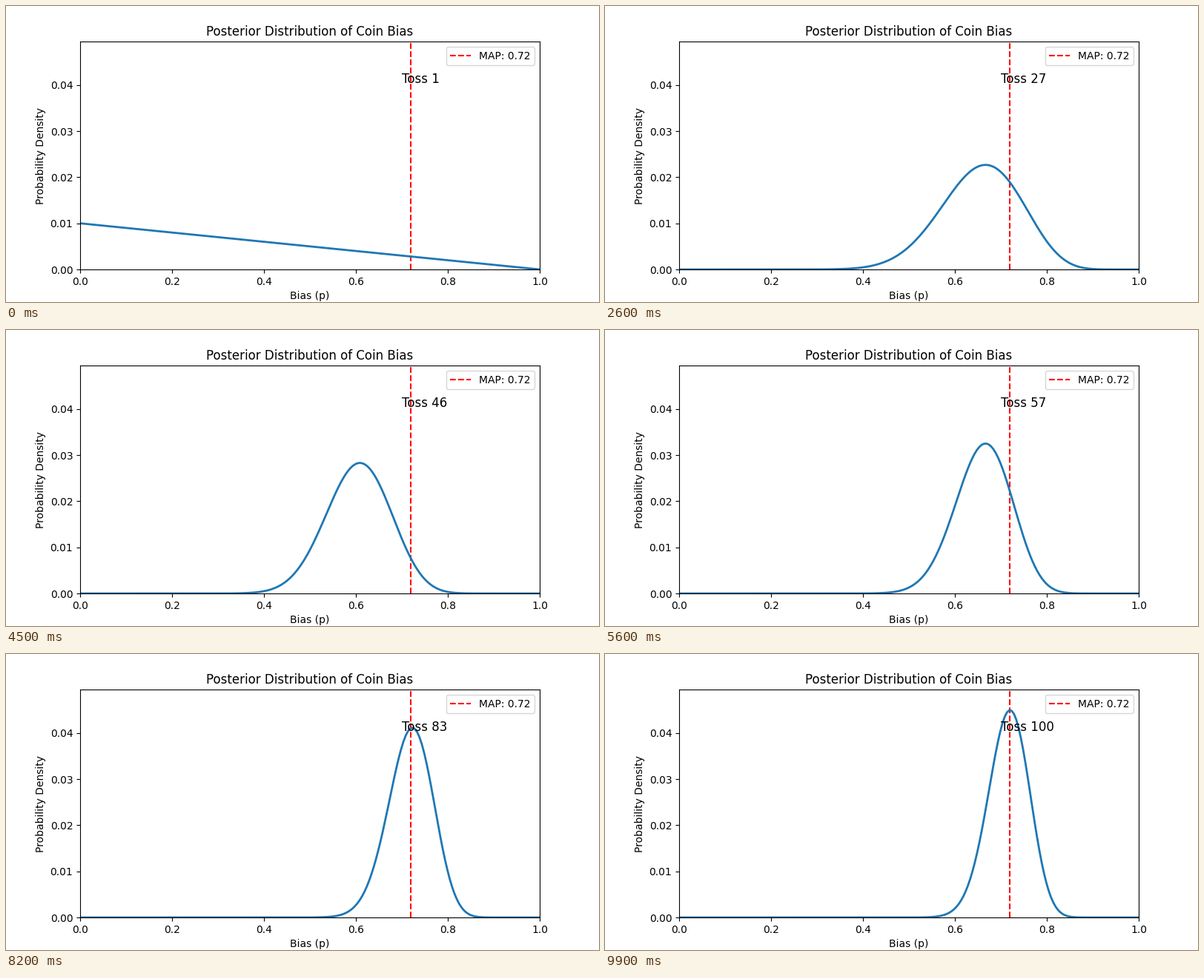
A matplotlib script that plays this animation: 800 px wide and 400 px high, repeating every 10000 ms.

```python
import numpy as np
import matplotlib.pyplot as plt
from matplotlib.animation import FuncAnimation

TOSSES = 100
# Milestones of the run as (toss, heads so far); even pace in between.
MILESTONES = [(1, 0), (12, 6), (23, 15), (34, 24), (45, 27), (56, 37),
              (67, 46), (76, 55), (78, 55), (83, 60), (89, 65), (100, 72)]

bias = np.linspace(0, 1, 200)


def heads_after(n):
    return round(np.interp(n, *zip(*MILESTONES)))


def posterior(n):
    """Normalised posterior on the bias grid after n tosses, flat prior."""
    h = heads_after(n)
    density = bias ** h * (1 - bias) ** (n - h)
    return density / density.sum()


peak = posterior(TOSSES).max()
map_bias = heads_after(TOSSES) / TOSSES

fig, ax = plt.subplots(figsize=(8, 4), dpi=100)
ax.set_xlim(0, 1)
ax.set_ylim(0, peak * 1.1)
ax.set_title("Posterior Distribution of Coin Bias")
ax.set_xlabel("Bias (p)")
ax.set_ylabel("Probability Density")

ax.axvline(map_bias, color="r", ls="--", label=f"MAP: {map_bias:.2f}")
curve, = ax.plot([], [], color="C0", lw=2)
counter = ax.text(0.7, peak * 0.9, "", fontsize=12)
ax.legend(loc="upper right")


def update(i):
    curve.set_data(bias, posterior(i + 1))
    counter.set_text(f"Toss {i + 1}")
    return curve, counter


anim = FuncAnimation(fig, update, frames=TOSSES, interval=100,
                     repeat=True, repeat_delay=0)
plt.show()
```
